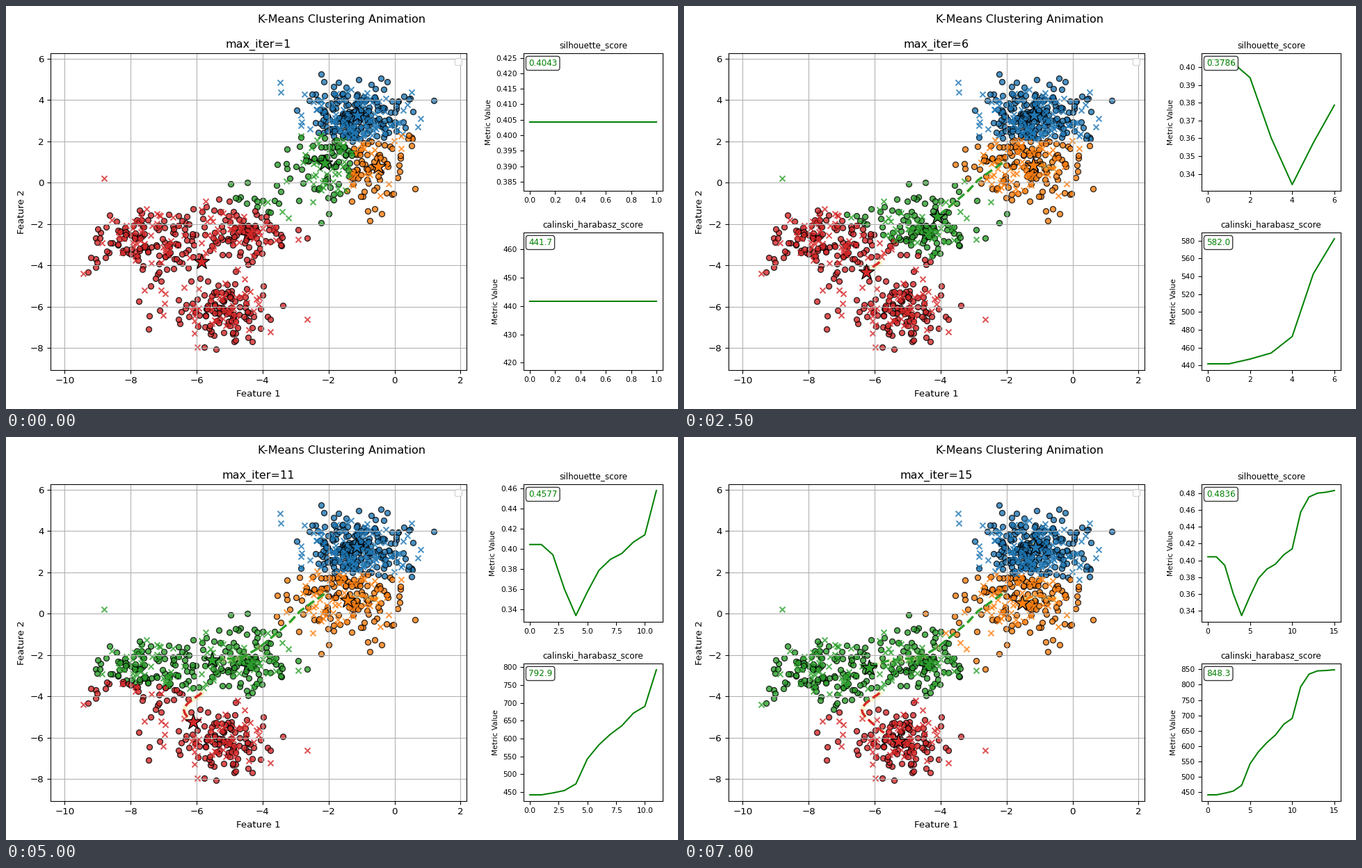
Animation, 966 px wide and 580 px high, one loop 7500 ms. Source, as a matplotlib script:

```python
import numpy as np
import matplotlib.pyplot as plt
from matplotlib.animation import FuncAnimation

W, H, DPI = 966, 580, 96
STEPS = 15
COLORS = ["tab:blue", "tab:orange", "tab:green", "tab:red"]
START = np.array([[-1.12, 3.27], [-0.505, 0.78], [-2.13, 0.95], [-5.85, -3.83]])


def make_blobs(n=1000, k=6, std=0.8, box=7.5, seed=1):
    rng = np.random.RandomState(seed)
    centers = rng.uniform(-box, box, (k, 2))
    sizes = [n // k + (i < n % k) for i in range(k)]
    pts = np.vstack([rng.normal(c, std, (m, 2)) for c, m in zip(centers, sizes)])
    order = np.arange(n)
    rng.shuffle(order)
    return pts[order]


def split(pts, share=0.3, seed=1):
    order = np.random.RandomState(seed).permutation(len(pts))
    cut = int(np.ceil(share * len(pts)))
    return pts[order[cut:]], pts[order[:cut]]


def distances(a, b):
    return np.linalg.norm(a[:, None] - b[None], axis=2)


def nearest(pts, centers):
    return distances(pts, centers).argmin(axis=1)


def silhouette(pts, labels):
    d = distances(pts, pts)
    sums = np.stack([d[:, labels == j].sum(axis=1) for j in range(4)], axis=1)
    counts = np.bincount(labels, minlength=4)
    rows = np.arange(len(pts))
    a = sums[rows, labels] / np.maximum(counts[labels] - 1, 1)
    means = sums / np.maximum(counts, 1)
    means[rows, labels] = np.inf
    b = means.min(axis=1)
    return np.mean((b - a) / np.maximum(a, b))


def calinski_harabasz(pts, labels):
    mean = pts.mean(axis=0)
    between = within = 0
    for j in range(4):
        group = pts[labels == j]
        mid = group.mean(axis=0)
        between += len(group) * np.sum((mid - mean) ** 2)
        within += np.sum((group - mid) ** 2)
    return (between / 3) / (within / (len(pts) - 4))


data = make_blobs()
train, test = split(data)

path = [START]
for _ in range(STEPS - 1):
    near = nearest(train, path[-1])
    path.append(np.array([train[near == j].mean(axis=0) for j in range(4)]))
path = np.array(path)

test_labels = [nearest(test, c) for c in path]
METRICS = [
    ("silhouette_score", "{:.4f}", [silhouette(test, l) for l in test_labels]),
    ("calinski_harabasz_score", "{:.1f}", [calinski_harabasz(test, l) for l in test_labels]),
]

fig = plt.figure(figsize=(10.0625, 6.04167), dpi=DPI)
fig.suptitle("K-Means Clustering Animation")


def panel(left, top, right, bottom):
    return fig.add_axes([left / W, 1 - bottom / H, (right - left) / W, (bottom - top) / H])


main = panel(64, 68, 662, 524)
sides = [panel(744, 68, 944, 266), panel(744, 326, 944, 524)]


def draw_clusters(i):
    main.clear()
    centers = path[i]
    for pts, style in ((train, dict(marker="o", edgecolors="k", linewidths=1)),
                       (test, dict(marker="x"))):
        labels = nearest(pts, centers)
        for j, color in enumerate(COLORS):
            main.scatter(*pts[labels == j].T, s=36, color=color if style["marker"] == "x" else None,
                         facecolor=None if style["marker"] == "x" else color, alpha=0.8, **style) \
                if style["marker"] == "x" else \
                main.scatter(*pts[labels == j].T, s=36, c=color, alpha=0.8, **style)
    for j, color in enumerate(COLORS):
        trail = path[:i + 1, j]
        main.scatter(*trail[:-1].T, s=100, marker="*", c="khaki", alpha=0.4, linewidths=0, zorder=1)
        main.plot(*trail.T, "--", color=color, lw=2.5)
        main.scatter(*centers[j], s=300, marker="*", c=color, edgecolors="k", linewidths=1, zorder=5)
    main.set(xlim=(data[:, 0].min() - 1, data[:, 0].max() + 1),
             ylim=(data[:, 1].min() - 1, data[:, 1].max() + 1),
             xlabel="Feature 1", ylabel="Feature 2", title=f"max_iter={i + 1}")
    main.grid(True)
    main.legend([], [], loc="upper right")


def draw_metric(ax, i, name, form, values):
    ax.clear()
    ax.plot([values[0]] + values[:i + 1], color="green")
    ax.set_title(name, fontsize=9)
    ax.set_ylabel("Metric Value", fontsize=8)
    ax.tick_params(labelsize=8)
    ax.text(0.035, 0.96, form.format(values[i]), transform=ax.transAxes, fontsize=9,
            color="green", va="top",
            bbox=dict(boxstyle="round,pad=0.3", facecolor="white", alpha=0.8))


def update(i):
    draw_clusters(i)
    for ax, metric in zip(sides, METRICS):
        draw_metric(ax, i, *metric)


anim = FuncAnimation(fig, update, frames=STEPS, interval=500, repeat=True, repeat_delay=0)
plt.show()
```
